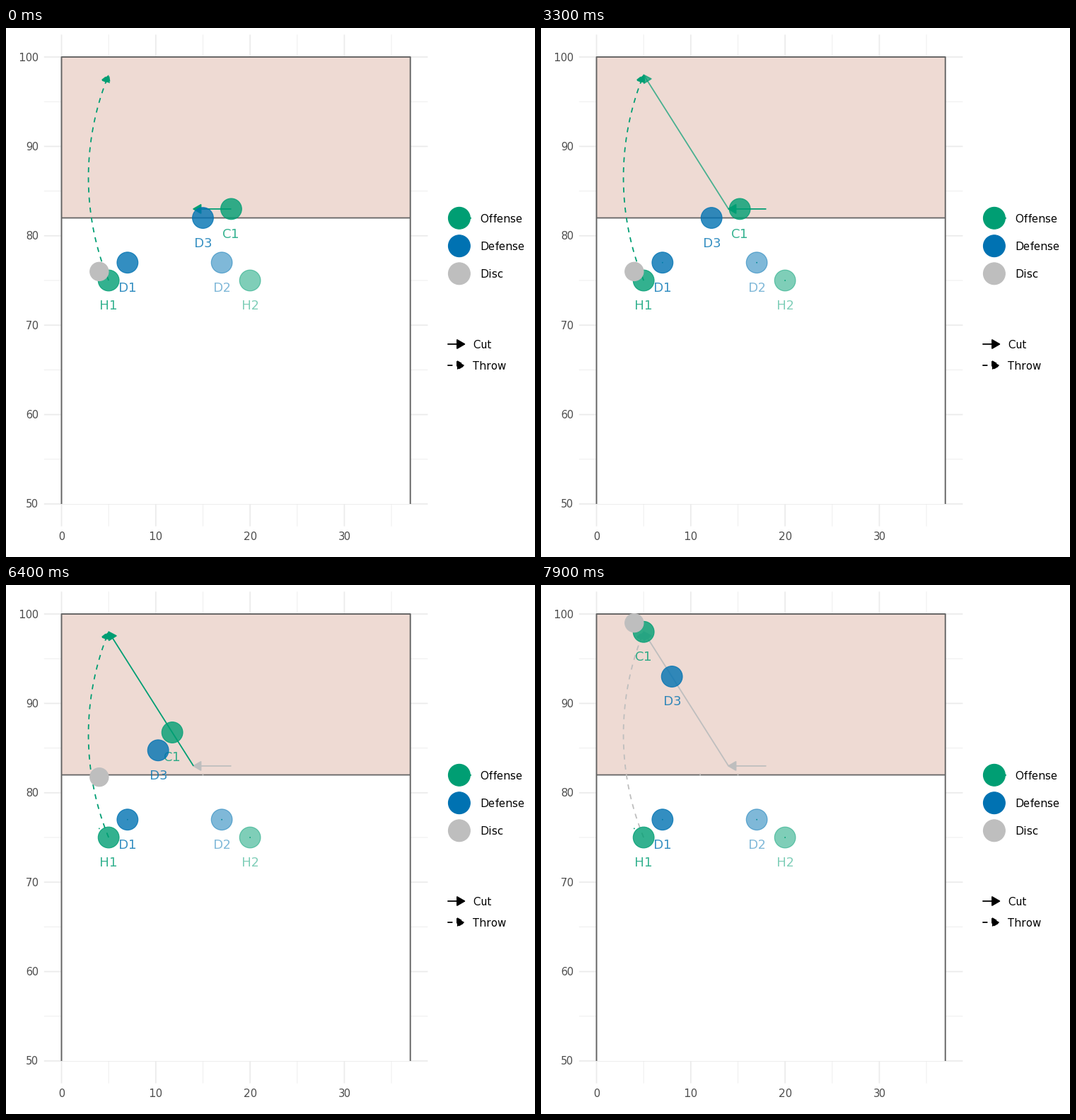
A matplotlib script that plays this animation: 748x748 px, repeating every 10000 ms.

```python
import numpy as np
import matplotlib.pyplot as plt
from matplotlib.animation import FuncAnimation
from matplotlib.lines import Line2D
from matplotlib.patches import Circle, Polygon, Rectangle

SIZE, DPI = 748, 100
PT = 72 / DPI                       # points per pixel
GREEN, BLUE, GREY = "#009E73", "#0072B2", "#BEBEBE"
EDGE, PINK, GRID = "#636363", "#EEDAD3", "#EBEBEB"
LINE = 1.78                         # stroke width in pixels
HEAD = 12                           # arrow head edge in pixels
DASH = (0, (4, 4))

plt.rcParams.update({
    "font.family": "DejaVu Sans",
    "text.hinting": "force_autohint",
    "text.hinting_factor": 1,
})

fig = plt.figure(figsize=(SIZE / DPI, SIZE / DPI), dpi=DPI, facecolor="white")
ax = fig.add_axes([0, 0, 1, 1])
ax.set_xlim(0, SIZE)
ax.set_ylim(SIZE, 0)
ax.axis("off")


def to_px(x, y):
    """Field position to stage pixels."""
    return np.array([78.5 + 13.33 * x, 41 + 12.64 * (100 - y)])


def line(xs, ys, color, width, z, style="-"):
    art = Line2D(xs, ys, color=color, lw=width * PT, ls=style, zorder=z,
                 solid_capstyle="butt", dash_capstyle="butt", snap=False)
    ax.add_line(art)
    return art


def label(x, y, text, size, color, z=5, ha="center", alpha=1):
    return ax.text(x, y, text, fontsize=size * PT, color=color, ha=ha,
                   va="baseline", alpha=alpha, zorder=z)


def disk(center, radius, color, z, alpha=1):
    art = Circle(center, radius, facecolor=color, edgecolor=color,
                 lw=1.18 * PT, alpha=alpha, zorder=z)
    ax.add_patch(art)
    return art


def dot(pos, color):
    art = Circle(to_px(*pos), 0.9, color=color, lw=0, zorder=4)
    ax.add_patch(art)
    return art


class Arrow:
    """Path in pixels with a closed head at its last point."""

    def __init__(self, points, color, style="-"):
        pts = np.asarray(points, float)
        self.shaft = line(pts[:, 0], pts[:, 1], color, LINE, 4, style)
        back = pts[-2] - pts[-1]
        turn = np.arctan2(back[1], back[0])
        wing = [pts[-1] + HEAD * np.array([np.cos(a), np.sin(a)])
                for a in (turn + np.pi / 6, turn - np.pi / 6)]
        self.head = Polygon([wing[0], pts[-1], wing[1]], facecolor=color,
                            edgecolor=color, lw=LINE * PT, ls=style,
                            joinstyle="round", zorder=4)
        ax.add_patch(self.head)

    def paint(self, color, alpha=1):
        for art in (self.shaft, self.head):
            art.set_color(color)
            art.set_alpha(alpha)


class Player:
    def __init__(self, name, color, alpha, *stops):
        self.stops = np.array(stops, float)
        self.body = disk((0, 0), 14.85, color, 6, alpha)
        self.tag = label(0, 0, name, 18.4, color, alpha=alpha)

    def move(self, a, b):
        x, y = to_px(*between(self.stops, a, b))
        self.body.center = x, y
        self.tag.set_position((x, y + 41))


def between(stops, a, b):
    """Position after share a of the first leg and share b of the second."""
    return stops[0] + a * (stops[1] - stops[0]) + b * (stops[2] - stops[1])


def arc(start, end, bulge, n=80):
    """Circular arc between two points on a vertical line, bulging left."""
    half = (start[1] - end[1]) / 2
    radius = (half ** 2 + bulge ** 2) / (2 * bulge)
    span = np.arcsin(half / radius)
    t = np.linspace(-span, span, n)
    x = start[0] - bulge + radius * (1 - np.cos(t))
    y = (start[1] + end[1]) / 2 - radius * np.sin(t)
    return np.column_stack([x, y])


def draw_field():
    left, top = to_px(-1.85, 102.5)
    right, bottom = to_px(38.85, 47.5)
    for i, x in enumerate(range(0, 40, 5)):
        px = to_px(x, 0)[0]
        line([px, px], [top, bottom], GRID, LINE / (1 + i % 2), 1)
        if i % 2 == 0:
            label(px, 724.3, str(x), 15, "#4D4D4D")
    for i, y in enumerate(range(50, 101, 5)):
        py = to_px(0, y)[1]
        line([left, right], [py, py], GRID, LINE / (1 + i % 2), 1)
        if i % 2 == 0:
            label(46, py + 5.5, str(y), 15, "#4D4D4D", ha="right")

    (x0, y0), (x1, y1) = to_px(0, 100), to_px(37, 50)
    goal = to_px(0, 82)[1]
    ax.add_patch(Rectangle((x0, y0), x1 - x0, y1 - y0, fc="white", lw=0,
                           zorder=2, snap=False))
    ax.add_patch(Rectangle((x0, y0), x1 - x0, goal - y0, fc=PINK, lw=0,
                           zorder=2, snap=False))
    line([x0, x0, x1, x1], [y1, y0, y0, y1], EDGE, 1.9, 3)
    line([x0, x1], [goal, goal], EDGE, LINE, 3)


def draw_legend():
    rows = [("Offense", GREEN, 268.8), ("Defense", BLUE, 308.2),
            ("Disc", GREY, 347.3)]
    for text, color, y in rows:
        disk((640.9, y), 15.4, color, 6)
        label(670, y + 5.7, text, 15, "black", ha="left")
    line([656, 658], [268.8, 268.8], GREEN, LINE, 6)
    for text, y, style in [("Cut", 447, "-"), ("Throw", 477, DASH)]:
        Arrow([(624.3, y), (648.3, y)], "black", style)
        label(660, y + 5.5, text, 15, "black", ha="left")


draw_field()
draw_legend()

throw = Arrow(arc(to_px(5, 75), to_px(5, 98), 28.6), GREEN, DASH)
first_cut = Arrow([to_px(18, 83), to_px(14, 83)], GREEN)
second_cut = Arrow([to_px(14, 83), to_px(5, 98)], GREEN)

still_dots = [dot(p, GREEN) for p in [(7, 77), (17, 77), (20, 75), (4, 76)]]
old_dots = [dot(p, GREY) for p in [(11, 82), (15, 82)]]

players = [
    Player("H1", GREEN, 0.8, *[(5, 75)] * 3),
    Player("H2", GREEN, 0.5, *[(20, 75)] * 3),
    Player("C1", GREEN, 0.8, (18, 83), (14, 83), (5, 98)),
    Player("D1", BLUE, 0.8, *[(7, 77)] * 3),
    Player("D2", BLUE, 0.5, *[(17, 77)] * 3),
    Player("D3", BLUE, 0.8, (15, 82), (11, 82), (8, 93)),
]
disc_stops = np.array([(4, 76), (4, 76), (4, 99)], float)
disc = disk((0, 0), 13.1, GREY, 7)


def update(frame):
    # two legs of 20 steps each, with rests around them
    a = np.clip((frame - 19) / 20, 0, 1)
    b = np.clip((frame - 59) / 20, 0, 1)
    for p in players:
        p.move(a, b)
    disc.center = tuple(to_px(*between(disc_stops, a, b)))

    first_cut.paint(GREY if a == 1 else GREEN)
    second_cut.paint(GREY if b == 1 else GREEN, a)
    throw.paint(GREY if b == 1 else GREEN)
    for d in still_dots:
        d.set_visible(a > 0)
    for d in old_dots:
        d.set_visible(b > 0)
    return []


anim = FuncAnimation(fig, update, frames=100, interval=100, repeat=True,
                     repeat_delay=0, blit=False)
plt.show()
```
